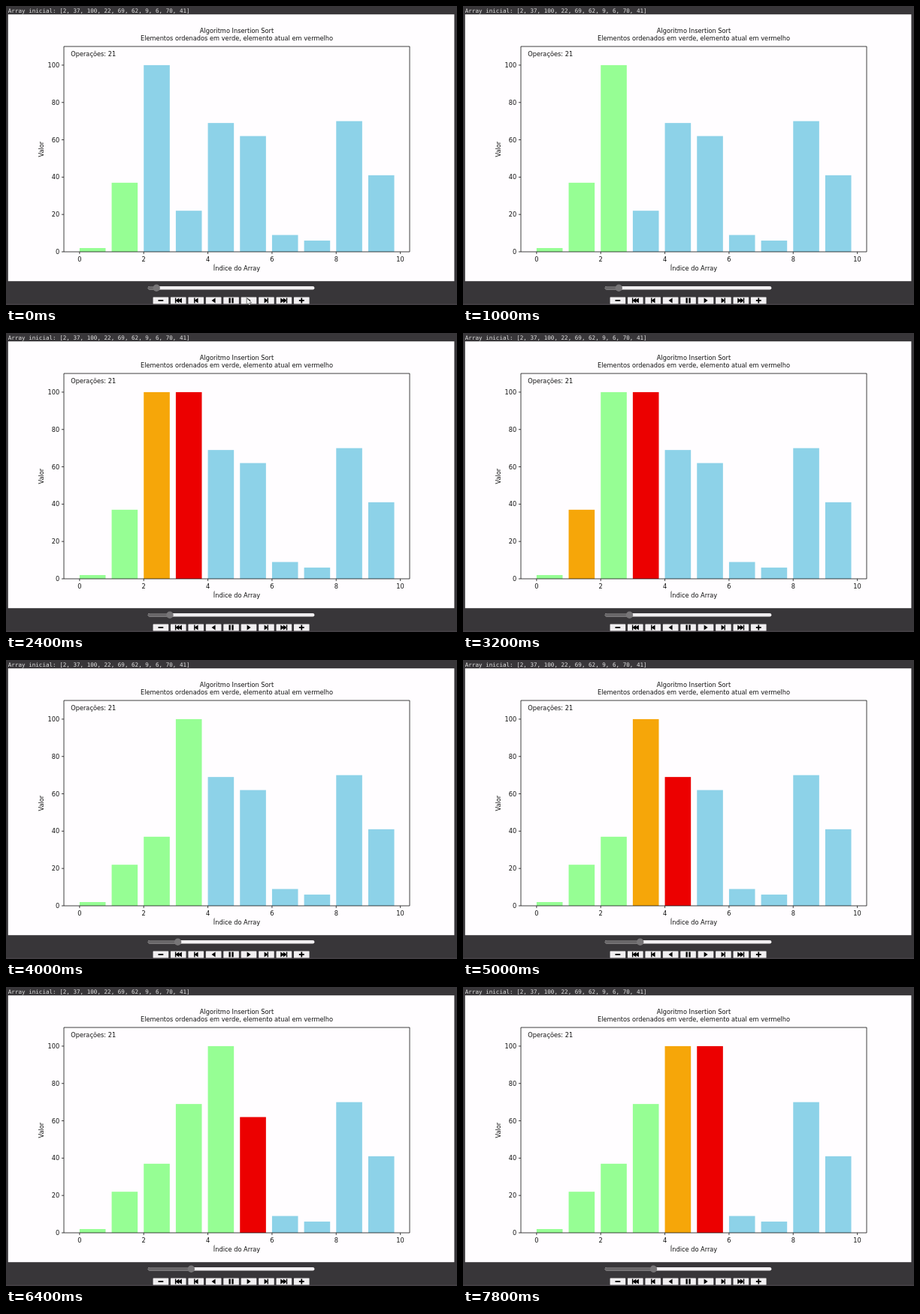
Write an HTML page that moves like this. It is 600 px wide and 399 px high and loops after 8 s.

```html
<!DOCTYPE html>
<html lang="pt">
<head>
<meta charset="utf-8">
<title>Insertion Sort</title>
<style>
  html, body { margin: 0; width: 100%; height: 100%; overflow: hidden; background: #383639; }
  svg { display: block; width: 100%; height: 100%; }
  text { font: 8.24px "DejaVu Sans", sans-serif; fill: #111; white-space: pre; }
  .mid { text-anchor: middle; }
  .end { text-anchor: end; }
  .mono { font: 7.58px "DejaVu Sans Mono", monospace; fill: #e2e2e2; }
</style>
</head>
<body>
<svg id="stage" viewBox="0 0 600 399"></svg>
<script>
const stage = document.getElementById('stage');
const LEFT = 77, RIGHT = 537, TOP = 54, BASE = 328;
const COLORS = { idle: '#8dd2e8', sorted: '#96fe94', current: '#ec0000', compared: '#f6a609' };
const LOOP = 8000, TICK = 200, STEP = 500, LEAD = 150;
const values = [2, 37, 100, 22, 69, 62, 9, 6, 70, 41];

const xAt = i => 97.9 + i * 42.67;
const yAt = v => BASE - v * (BASE - TOP) / 110;

function add(tag, attrs, content) {
  const el = document.createElementNS('http://www.w3.org/2000/svg', tag);
  for (const key in attrs) el.setAttribute(key, attrs[key]);
  if (content !== undefined) el.textContent = content;
  return stage.appendChild(el);
}
const rect = (x, y, width, height, fill, rx = 0) => add('rect', { x, y, width, height, fill, rx });
const label = (x, y, content, cls = '', more = {}) => add('text', { x, y, class: cls, ...more }, content);

// Every visible state of the sort, starting with two sorted items.
function sortSteps(list, last) {
  const a = [...list], steps = [];
  const push = (sorted, current = -1, compared = -1) =>
    steps.push({ heights: [...a], sorted, current, compared });
  push(1);
  for (let i = 2; i <= last; i++) {
    const key = a[i];
    let j = i - 1;
    push(i, i);
    for (; j >= 0 && a[j] > key; j--) {
      push(i, i, j);
      a[j + 1] = a[j];
      push(i, i, j);
    }
    a[j + 1] = key;
    push(i);
  }
  return steps;
}
const steps = sortSteps(values, 5);

// Page and chart
rect(0, 0, 600, 399, '#383639');
rect(0, 397.6, 600, 1, '#4b474c');
label(2.8, 8.6, `Array inicial: [${values.join(', ')}]`, 'mono');
rect(2.8, 11.2, 593.6, 356, '#fffdff');
label(307, 36, 'Algoritmo Insertion Sort', 'mid');
label(307, 45.5, 'Elementos ordenados em verde, elemento atual em vermelho', 'mid');

const bars = values.map((v, i) => rect(xAt(i), 0, 34.6, 0, COLORS.idle));

let ticks = '';
for (let i = 0; i <= 10; i += 2) {
  ticks += `M${xAt(i)} ${BASE}v3`;
  label(xAt(i), 340.7, i, 'mid');
}
for (let v = 0; v <= 100; v += 20) {
  ticks += `M${LEFT} ${yAt(v)}h-3`;
  label(71.2, yAt(v) + 3.1, v, 'end');
}
add('path', {
  d: `M${LEFT} ${TOP}H${RIGHT}V${BASE}H${LEFT}Z${ticks}`,
  fill: 'none', stroke: '#111', 'stroke-width': 0.8
});
label(86.2, 67.4, 'Operações: 21');
label(307, 353, 'Índice do Array', 'mid');
label(0, 0, 'Valor', 'mid', { transform: 'translate(49.6 191.2) rotate(-90)' });

// Slider
rect(188.8, 374, 221.6, 4.6, '#f1eff1', 2.3);
const fill = rect(188.8, 374, 0, 4.6, '#696769', 2.3);
const thumb = add('circle', { cy: 376.3, r: 4.7, fill: '#777577' });

// Player buttons, icons drawn around their centre
const back = x => `M${x} -3.4v6.8l-5 -3.4z`;
const forward = x => `M${x} -3.4v6.8l5 -3.4z`;
const bar = (x, w = 1.4) => `M${x} -3.4h${w}v6.8h${-w}z`;
const minus = 'M-3.4 -.9h6.8v1.8h-6.8z';
const icons = [
  minus,
  bar(-4.4) + back(1) + back(4.6),
  bar(-2.6) + back(2.8),
  back(2.4),
  bar(-3.1, 2.3) + bar(0.8, 2.3),
  forward(-2.4),
  forward(-2.8) + bar(1.2),
  forward(-4.6) + forward(-1) + bar(3),
  minus + 'M-.9 -3.4h1.8v6.8h-1.8z'
];
icons.forEach((d, i) => {
  const x = 195.6 + i * 23.42;
  rect(x, 388.5, 20.6, 9, '#f1eff1', 0.5);
  add('path', { d, fill: '#000', transform: `translate(${x + 10.3} 393)` });
});

const pointer = add('path', {
  d: 'M320.2 389.5v9.2l2.1 -2 1.4 3 1.5 -.7 -1.4 -2.9h2.8z',
  fill: '#fff', stroke: '#222', 'stroke-width': 0.6
});

function render(ms) {
  const t = Math.floor(ms % LOOP / TICK) * TICK;
  const k = Math.floor((t + LEAD) / STEP);
  const { heights, sorted, current, compared } = steps[k];
  bars.forEach((el, i) => {
    const kind = i === current ? 'current' : i === compared ? 'compared' : i <= sorted ? 'sorted' : 'idle';
    el.setAttribute('y', yAt(heights[i]));
    el.setAttribute('height', BASE - yAt(heights[i]));
    el.setAttribute('fill', COLORS[kind]);
  });
  const x = 200.2 + k * 3.55;
  thumb.setAttribute('cx', x);
  fill.setAttribute('width', x - 188.8);
  pointer.setAttribute('visibility', t < TICK ? 'visible' : 'hidden');
}

const start = performance.now();
function loop() {
  render(performance.now() - start);
  requestAnimationFrame(loop);
}
loop();
</script>
</body>
</html>
```
